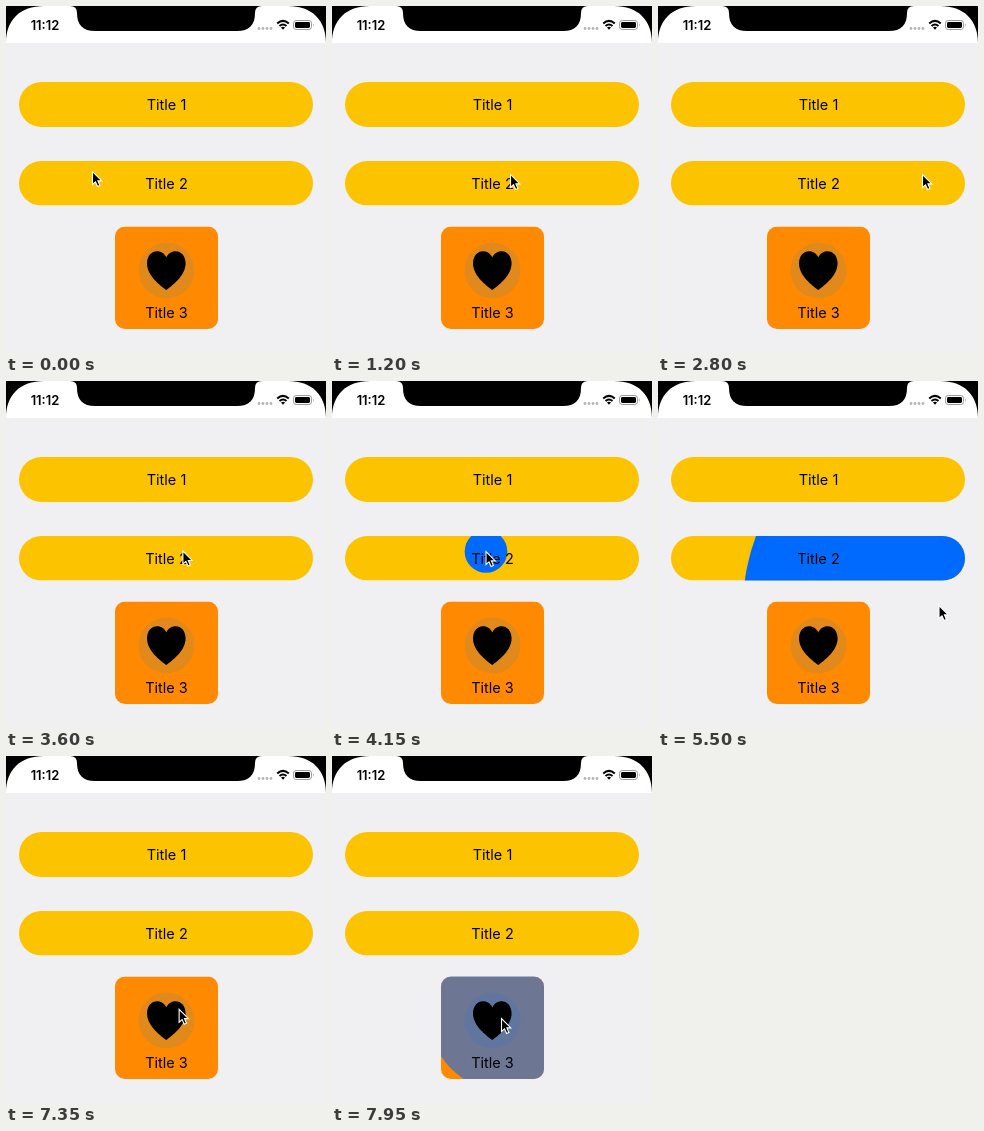
An HTML page for the animation above (8000 ms loop, 320 by 347 pixels).

```html
<!DOCTYPE html>
<html lang="en">
<head>
<meta charset="utf-8">
<title>Ripple buttons</title>
<style>
  html, body { margin: 0; width: 100%; height: 100%; overflow: hidden; background: #f0eff2; }
  svg { display: block; width: 320px; height: 347px; }
  text { font-family: Inter, "Liberation Sans", sans-serif; font-size: 14.5px; text-anchor: middle; }
  .clock { font-size: 13px; font-weight: 600; }
</style>
</head>
<body>
<svg viewBox="0 0 320 347">
  <defs>
    <clipPath id="pill"><rect x="13" y="155" width="294" height="44.5" rx="22.25"/></clipPath>
    <clipPath id="card"><rect x="109" y="220.5" width="103" height="102.5" rx="10"/></clipPath>
  </defs>

  <rect width="320" height="347" fill="#f0eff2"/>
  <rect width="320" height="37" fill="#fff"/>
  <path d="M0 0H38C14 0 0 14 0 37ZM320 0H282C306 0 320 14 320 37Z"/>
  <path d="M64 0Q71 0 71 7C71 19 77 25 89 25H231C243 25 249 19 249 7Q249 0 256 0Z"/>

  <text class="clock" x="39" y="23.5">11:12</text>
  <g fill="#b5b5b5">
    <circle cx="253" cy="22.5" r="1.4"/><circle cx="257" cy="22.5" r="1.4"/>
    <circle cx="261" cy="22.5" r="1.4"/><circle cx="265" cy="22.5" r="1.4"/>
  </g>
  <g fill="none" stroke="#000" stroke-width="2">
    <path d="M271.2 17.5Q277 12.3 282.8 17.5M273.5 20Q277 17 280.5 20"/>
  </g>
  <path d="M275 21.5Q277 20 279 21.5L277 23.8Z"/>
  <rect x="287.5" y="14.5" width="18" height="9" rx="2.7" fill="none" stroke="#999"/>
  <rect x="289" y="16" width="15" height="6" rx="1.4"/>
  <path d="M307 17.2Q308.6 19 307 20.8Z" fill="#999"/>

  <rect x="13" y="76" width="294" height="45" rx="22.5" fill="#fcc400"/>
  <text x="160.5" y="104">Title 1</text>

  <g clip-path="url(#pill)">
    <rect x="13" y="155" width="294" height="44.5" fill="#fcc400"/>
    <circle id="pillRipple" fill="#006aff"/>
  </g>
  <text x="160.5" y="183">Title 2</text>

  <g clip-path="url(#card)">
    <rect x="109" y="220.5" width="103" height="102.5" fill="#ff8900"/>
    <circle cx="160.5" cy="264.5" r="28" fill="#e2891c"/>
    <circle id="cardRipple" fill="#006aff"/>
  </g>
  <path d="M160.3 284C155 280 141 270 141 257.5C141 250 145.5 245.3 151 245.3C155.5 245.3 158.6 247.8 160.3 251.5C162 247.8 165.2 245.3 169.6 245.3C175.2 245.3 179.6 250 179.6 257.5C179.6 270 165.6 280 160.3 284Z"/>
  <text x="160.5" y="312">Title 3</text>

  <path id="cursor" d="M0 0V13L3 10.3L5.1 15L7.4 14L5.4 9.4H9.3Z" stroke="#fff" stroke-width="1.1"/>
</svg>
<script>
const LOOP = 8000;
const REST = Math.SQRT1_2; // held radius, as a share of the farthest-corner distance

// time, x, y of the pointer tip
const path = [
  [0, 86.5, 165.5], [430, 86.5, 165.5], [1800, 241.5, 170.5], [2050, 241.5, 170.5],
  [2700, 264.5, 168.5], [3000, 264.5, 168.5], [3850, 154, 170.5], [4500, 154, 170.5],
  [5500, 281, 224.5], [6800, 227.5, 114.5], [7450, 169.5, 262.5], [LOOP, 169.5, 262.5]
];

const ripples = [
  { id: "pillRipple", box: [13, 155, 307, 199.5], down: 4010, up: 6900, grow: 500, fade: 400 },
  { id: "cardRipple", box: [109, 220.5, 212, 323], down: 7470, up: 7780, grow: 300, fade: 400 }
].map(r => ({ ...r, node: document.getElementById(r.id) }));

const cursor = document.getElementById("cursor");
const clamp = v => Math.min(1, Math.max(0, v));
const ease = v => v * v * (3 - 2 * v);

function pointerAt(t) {
  const i = Math.max(1, path.findIndex(p => p[0] >= t));
  const [t0, x0, y0] = path[i - 1], [t1, x1, y1] = path[i];
  const k = ease(clamp((t - t0) / (t1 - t0)));
  return [x0 + (x1 - x0) * k, y0 + (y1 - y0) * k];
}

function drawRipple({ node, box, down, up, grow, fade }, t) {
  const [x, y] = pointerAt(Math.min(t, up));
  const [left, top, right, bottom] = box;
  const reach = Math.hypot(Math.max(x - left, right - x), Math.max(y - top, bottom - y));
  const opened = ease(clamp((t - down) / grow));
  const released = clamp((t - up) / fade);
  node.setAttribute("cx", x);
  node.setAttribute("cy", y);
  node.setAttribute("r", reach * (REST * opened + (1 - REST) * released));
  node.setAttribute("opacity", t < down ? 0 : 1 - released);
}

function draw(now) {
  const t = now % LOOP;
  const [x, y] = pointerAt(t);
  cursor.setAttribute("transform", `translate(${x} ${y})`);
  ripples.forEach(r => drawRipple(r, t));
}

const start = performance.now();
function tick() {
  draw(performance.now() - start);
  requestAnimationFrame(tick);
}
tick();
</script>
</body>
</html>
```
